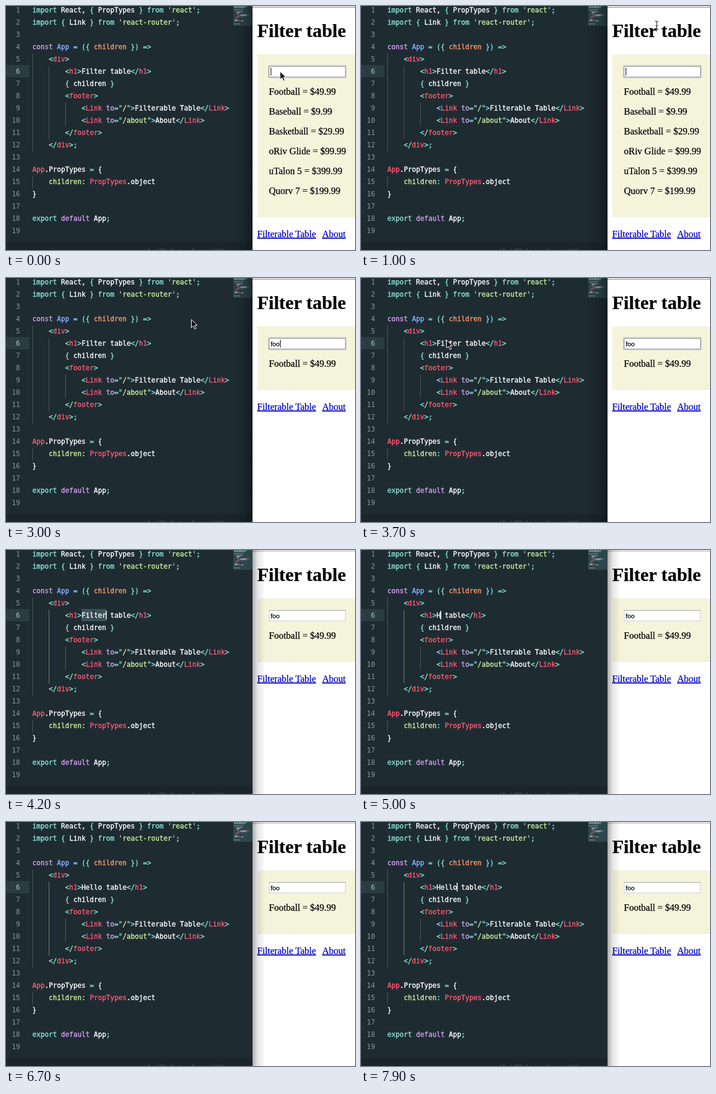
An HTML page for the animation above (8 s loop, 596x418 px).

```html
<!DOCTYPE html>
<html>
<head>
<meta charset="utf-8">
<style>
html, body { margin: 0; width: 596px; height: 418px; overflow: hidden; background: #fff; }
svg { display: block; }
text { white-space: pre; }
.code text { font: 11.63px "DejaVu Sans Mono", monospace; stroke-width: .35; }
.page text { font: 16px "Liberation Serif", serif; stroke: #000; stroke-width: .25; }
.page .title { font-weight: bold; font-size: 32px; }
.page .link { fill: #0000c4; stroke: #0000c4; text-decoration: underline; }
.page .typed { font: 11px "Liberation Sans", sans-serif; }
.guide { stroke: #71858c; stroke-dasharray: 1 1; }
</style>
</head>
<body>
<svg width="596" height="418" viewBox="0 0 596 418">
  <defs>
    <linearGradient id="dark"><stop stop-opacity=".06"/><stop offset=".5" stop-opacity=".12"/><stop offset="1" stop-opacity=".35"/></linearGradient>
    <linearGradient id="light"><stop stop-opacity=".32"/><stop offset=".4" stop-opacity=".1"/><stop offset="1" stop-opacity="0"/></linearGradient>
  </defs>

  <rect width="421" height="418" fill="#1e2c32"/>
  <rect y="404" width="421" height="14" fill="#1a262c"/>
  <rect y="101" width="40" height="21" fill="#2b3b42"/>
  <rect x="388" width="33" height="34" fill="#2d454b"/>
  <g id="map" opacity=".8"></g>
  <rect id="selection" x="129" y="101" width="42" height="21" fill="#3d525b"/>
  <g id="guides"></g>
  <g id="code" class="code"></g>
  <rect id="caret" y="104" width="1.5" height="15" fill="#fff"/>
  <text x="235" y="424" font-size="10" font-family="Inter, sans-serif" fill="#46575e">LF   UTF-8   JavaScript (JSX)</text>
  <rect id="editorShade" x="387" width="34" height="418" fill="url(#dark)"/>

  <g class="page">
    <rect x="421" width="175" height="418" fill="#fff"/>
    <rect x="421" width="175" height="2" fill="#e2e2e2"/>
    <rect id="toolbar" x="421" y="2" width="175" height="1"/>
    <text class="title" x="429" y="53">Filter table</text>
    <rect id="panel" x="429" y="83" width="167" fill="#f3f4da"/>
    <rect id="glow" x="448.5" y="102.5" width="132" height="20" rx="1.5" fill="none" stroke="#b4b4c4" stroke-width="2.5" opacity=".6"/>
    <rect id="field" x="449.5" y="103.5" width="130" height="18" fill="#fff"/>
    <path id="fieldTop" d="M449 103.5h131" stroke="#a4a4a4"/>
    <text id="typed" class="typed" x="452" y="117"></text>
    <rect id="inputCaret" y="106" width="1" height="13"/>
    <g id="items"></g>
    <g id="links">
      <text class="link" x="429" y="396">Filterable Table</text>
      <text class="link" x="540" y="396">About</text>
    </g>
    <rect id="pageShade" x="421" width="22" height="418" fill="url(#light)"/>
  </g>

  <path id="arrow" d="M0 0V14L3.3 11L5.8 16.5L8.2 15.4L5.8 10.2H10Z" fill="#111" stroke="#fff"/>
  <path id="beam" d="M-3 -7Q0 -7 0 -5Q0 -7 3 -7M0 -5V5M-3 7Q0 7 0 5Q0 7 3 7M-2 1H2" fill="none" stroke="#333" stroke-width="1.2"/>
</svg>
<script>
const el = id => document.getElementById(id);
const NS = 'http://www.w3.org/2000/svg';
const set = (node, attrs) => { for (const k in attrs) node.setAttribute(k, attrs[k]); };
const show = (id, on) => set(el(id), { visibility: on ? 'visible' : 'hidden' });
function add(parent, tag, attrs, text = '') {
  const node = parent.appendChild(document.createElementNS(NS, tag));
  set(node, attrs);
  node.textContent = text;
  return node;
}

// Each token starts with its colour letter.
const COLORS = { t: '#8be6da', w: '#ffffff', g: '#cdefa0', r: '#ff5874', p: '#d3a2f0', b: '#8ab2ff', o: '#ff9873' };
const CODE = [
  "timport |wReact, |t{ |wPropTypes |t} from '|greact|t';",
  "timport { |wLink |t} from '|greact-router|t';",
  "",
  "pconst |bApp |t= ({ |ochildren |t}) =>",
  "t    <|rdiv|t>",
  "t        <|rh1|t>|wFilter|w table|t</|rh1|t>",
  "t        { |wchildren |t}",
  "t        <|rfooter|t>",
  "t            <|rLink |pto|t=\"|g/|t\">|wFilterable Table|t</|rLink|t>",
  "t            <|rLink |pto|t=\"|g/about|t\">|wAbout|t</|rLink|t>",
  "t        </|rfooter|t>",
  "t    </|rdiv|t>;",
  "",
  "rApp|w.PropTypes |t= |w{",
  "g    children|t: |rPropTypes|w.object",
  "w}",
  "",
  "texport |pdefault |wApp|t;",
  ""
];

let word;
CODE.forEach((line, row) => {
  const y = 11 + 21 * row;
  add(el('code'), 'text', { x: 24, y, 'text-anchor': 'end', fill: row === 5 ? '#b4c2c7' : '#87979d' }, row + 1);
  const text = add(el('code'), 'text', { x: 45, y });
  let col = 0;
  for (const token of line.split('|').filter(Boolean)) {
    const fill = COLORS[token[0]], body = token.slice(1);
    const span = add(text, 'tspan', { fill, stroke: fill }, body);
    if (body === 'Filter') word = span;
    const indent = body.length - body.trimStart().length;
    add(el('map'), 'rect', {
      x: 389 + (col + indent) * .55, y: .5 + row * 1.75,
      width: body.trim().length * .5, height: 1, fill
    });
    col += body.length;
  }
});

const guide = (x, top, bottom) => add(el('guides'), 'path', { class: 'guide', d: `M${x + .5} ${top}V${bottom}` });
guide(45, 82, 250);
guide(101, 166, 206);
guide(45, 292, 311);
const activeGuide = guide(73, 103, 229);

const items = ['Football = $49.99', 'Baseball = $9.99', 'Basketball = $29.99',
  'oRiv Glide = $99.99', 'uTalon 5 = $399.99', 'Quorv 7 = $199.99'
].map((s, i) => add(el('items'), 'text', { x: 449, y: 152 + 34 * i }, s));

const count = (times, t) => times.filter(k => t >= k).length;
const SEARCH_KEYS = [1500, 1700, 1900];
const EDIT_KEYS = [4900, 5200, 5400, 5600, 5900];
const CLICK = 3900;

function glide(t, start, end, from, to) {
  const u = Math.min(1, Math.max(0, (t - start) / (end - start)));
  const e = u * u * (3 - 2 * u);
  return from.map((v, i) => v + (to[i] - v) * e);
}

function drawMouse(t) {
  const beam = t >= 500 && t < 1500 || t >= CLICK && t < EDIT_KEYS[0];
  const arrow = t < 500 || t >= 2400 && t < CLICK;
  const [x, y] = t < 2000
    ? glide(t, 200, 900, [468, 112], [505, 33])
    : glide(t, 2400, 3600, [487, 36], [146, 106]);
  show('beam', beam);
  show('arrow', arrow);
  const shift = t >= CLICK ? 5 : 0;
  set(el(beam ? 'beam' : 'arrow'), { transform: `translate(${x + shift} ${y + shift})` });
}

function draw(t) {
  const editing = t >= CLICK;
  const found = count(SEARCH_KEYS, t), letters = count(EDIT_KEYS, t);

  // Browser page
  el('typed').textContent = 'foo'.slice(0, found);
  items.forEach((item, i) => set(item, { visibility: found && i ? 'hidden' : 'visible' }));
  set(el('panel'), { height: found ? 109 : 279 });
  set(el('links'), { transform: `translate(0 ${found ? -170 : 0})` });
  const blinkStart = found ? SEARCH_KEYS[found - 1] : 0;
  show('inputCaret', !editing && (t - blinkStart) % 1000 < 500);
  set(el('inputCaret'), { x: 452 + [0, 3.5, 10, 16][found] });
  show('glow', !editing);
  show('fieldTop', editing);
  set(el('field'), { stroke: editing ? '#cfcfcf' : '#9898aa' });
  set(el('toolbar'), { fill: editing ? '#c8c8c8' : '#999' });
  show('pageShade', editing);
  show('editorShade', !editing);

  // Editor
  word.textContent = letters ? 'Hello'.slice(0, letters) : 'Filter';
  show('selection', t >= 4100 && !letters);
  set(el('caret'), { x: 129 + 7 * (letters || 6) - .5 });
  show('caret', editing && (t < 6100 || (t - 6100) % 800 < 400));
  set(activeGuide, { style: editing ? 'stroke:#d3cc80' : '' });

  drawMouse(t);
}

const begin = performance.now();
function tick() {
  const t = (performance.now() - begin) % 8000;
  draw(Math.floor(t / 100) * 100);
  requestAnimationFrame(tick);
}
tick();
</script>
</body>
</html>
```
